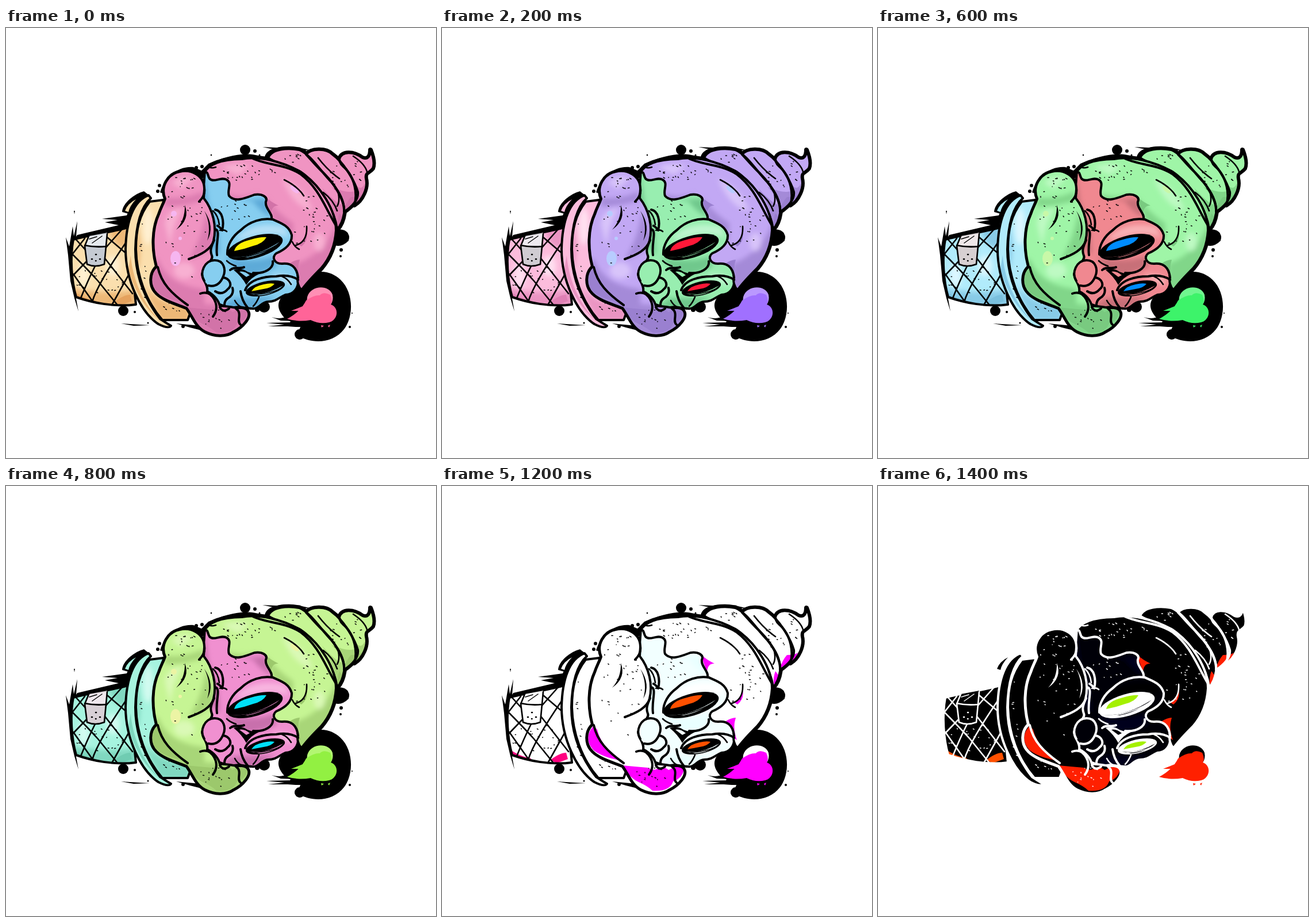
Recreate the animation shown at these times as an HTML page. Size 748 by 748 pixels, loop 1600 ms.

```html
<!DOCTYPE html>
<html lang="en">
<head>
<meta charset="utf-8">
<title>Ice cream</title>
<style>
html, body { margin: 0; width: 100%; height: 100%; overflow: hidden; background: #fff; }
svg { display: block; width: 100vw; height: 100vh; }
.ink { fill: var(--line); }
.halo { fill: var(--line); stroke: var(--line); stroke-width: 12; stroke-linejoin: round; }
.ice { fill: var(--ice); } .face { fill: var(--face); } .cone { fill: var(--cone); }
.deep { fill: var(--deep); } .eye { fill: var(--eye); }
.line { fill: none; stroke: var(--line); stroke-width: 4; stroke-linecap: round; stroke-linejoin: round; }
.thin { stroke-width: 2.6; } .fine { stroke-width: 1.5; }
.soft { filter: url(#blur); }
.dark { fill: var(--shade); } .lite { fill: var(--lite); }
</style>
</head>
<body>
<svg viewBox="0 0 748 748">
<defs>
  <filter id="blur" x="-30%" y="-30%" width="160%" height="160%"><feGaussianBlur stdDeviation="4"/></filter>
  <path id="waffle" d="M117 368 C145 360 180 356 212 347 L226 481 C190 486 150 478 122 468 C114 440 111 400 117 368Z"/>
  <path id="lip" d="M248 291 C222 300 209 335 208 385 C208 440 235 495 265 515 Q283 524 287 518 Q280 514 268 506 C240 470 225 430 225 385 C226 345 234 312 252 296Z"/>
  <path id="collar" d="M250 302 C232 325 226 350 226 385 C227 430 243 475 272 508 L316 508 L330 470 L280 400 L274 299Z"/>
  <path id="blob" d="M277 297 C268 276 282 254 302 250 C324 245 345 258 345 280 L344 296 C360 316 367 345 361 370 C358 380 354 386 358 396 C362 404 344 414 341 428 C342 440 352 446 350 458 C362 464 370 474 372 484 C385 482 395 488 410 487 C424 488 426 500 416 512 C410 520 404 524 396 528 C382 538 362 536 346 528 C330 520 324 500 314 487 C296 480 274 474 262 462 C248 448 250 426 262 415 C254 385 254 350 266 324 C270 312 274 306 277 297Z"/>
  <path id="skin" d="M346 248 L470 262 L500 345 L508 436 C510 452 500 464 486 464 C476 468 470 476 456 476 C444 476 440 490 428 488 C414 488 404 482 392 488 L340 470 L335 400 L343 290Z"/>
  <path id="dome" d="M345 252 C352 238 374 228 410 228 C440 222 480 232 512 250 C548 274 574 318 574 352 C572 384 560 404 548 418 C534 432 524 442 514 456 C508 450 506 440 508 434 C506 416 496 408 480 410 C466 410 462 398 470 392 C484 386 498 376 497 360 C492 342 474 338 462 332 C464 322 450 314 452 302 C456 294 446 288 432 290 C416 296 398 304 388 292 C384 282 394 270 384 264 C374 258 362 270 354 262 C350 256 352 248 345 252Z"/>
  <path id="tierA" d="M456 226 C462 210 490 208 510 212 C530 220 548 250 566 268 C580 285 590 305 588 322 C586 336 582 344 576 350 C572 318 548 276 512 250 C494 240 470 236 456 226Z"/>
  <path id="tierB" d="M522 220 C530 210 556 208 568 220 C585 232 605 262 612 285 C614 300 600 312 588 320 C590 300 570 268 548 248 C536 236 528 226 522 220Z"/>
  <path id="tierC" d="M580 228 C584 214 604 214 620 226 C630 230 634 222 634 212 C638 222 642 234 638 244 C632 252 624 250 626 262 C630 278 620 300 606 308 C612 288 606 262 592 246 C586 240 580 236 580 228Z"/>
  <clipPath id="inWaffle"><use href="#waffle"/></clipPath>
  <clipPath id="inCollar"><use href="#collar"/></clipPath>
  <clipPath id="inBlob"><use href="#blob"/></clipPath>
  <clipPath id="inSkin"><use href="#skin"/></clipPath>
  <clipPath id="inDome"><use href="#dome"/></clipPath>
</defs>

<!-- ink splashes -->
<g class="ink">
  <path d="M520 440 C535 416 566 422 582 438 C605 460 605 502 588 524 C568 550 530 550 506 534 L514 516 L488 508 C474 494 470 482 478 470Z"/>
  <path d="M453 513 L494 512 L500 500 L530 520 L504 520 L490 519 L456 519 L484 516Z"/>
  <path d="M462 503 Q480 508 490 500 L510 510 L478 509Z"/>
  <path d="M167 332 L210 326 L218 308 L224 322 L210 350 L120 366 L124 360 L196 343 L172 338 L194 334Z"/>
  <path d="M202 320 C203 304 224 288 240 284 L249 291 Q226 304 216 324Z"/>
  <path d="M118 318 l2 0 -1 6z M124 336 L122 364 L130 361 L120 372 L120 460 L126 493 L119 470 L112 440 L108 395 L104 364 L110 380 L116 345 L118 362Z"/>
  <path d="M268 286 C276 258 300 240 326 242 L340 248 L352 236 C380 224 410 216 434 221 L450 224 C454 208 480 203 510 208 L528 212 L500 216 L450 232 L345 260 L280 290Z"/>
  <path d="M446 207 L515 210 L470 212Z M200 514 L250 517 L222 518Z M296 514 L338 518 L340 526 L320 521Z"/>
  <path d="M577 350 Q600 350 596 370 Q584 382 572 378Z M552 414 L530 445 L512 460 L505 452Z"/>
  <g id="drops"></g>
</g>

<!-- cone -->
<path d="M207 318 Q211 306 226 298 Q215 310 213 320Z" class="cone"/>
<use href="#waffle" class="cone"/>
<g clip-path="url(#inWaffle)" style="--shade:var(--coneShade);--lite:var(--coneLite)">
  <g class="soft">
    <path class="dark" d="M112 450 Q160 466 230 455 L230 495 L112 490Z M178 350 L215 340 L212 380 Q190 390 178 350Z"/>
    <ellipse class="lite" cx="135" cy="430" rx="10" ry="22"/><ellipse class="lite" cx="186" cy="414" rx="12" ry="18"/>
  </g>
  <path fill="var(--coneDeep)" d="M122 461 Q138 471 155 474 L152 481 L122 472Z M188 477 Q205 464 216 464 L219 475 L200 482Z"/>
</g>
<path class="line thin" d="M121 367 L140 388 M114 392 Q142 420 160 440 L194 482 M117 428 L151 476 M173 402 L220 462 M176 364 L210 393 M115 394 L137 366 M117 430 L141 405 M130 470 Q142 440 155 414 M150 476 Q160 444 208 374 M184 482 L213 430 M172 384 L202 350"/>
<use href="#waffle" class="line"/>
<path fill="var(--patch)" d="M144 362 L176 356 L173 382 L171 412 Q155 417 141 413 L137 379Z"/>
<path fill="var(--patchLite)" d="M145 363 L175 358 L172 378 L139 378Z"/>
<path class="line thin" d="M144 362 L137 379 L141 411 Q155 417 171 411 L174 380 L176 358 M137 378 Q155 382 174 380"/>
<path class="line thin" d="M149 402 h1 M156 394 h1 M163 402 h1 M156 405 h.5"/>
<path class="line fine" d="M145 367 L158 363 M150 374 L167 362"/>
<use href="#collar" class="cone"/>
<g class="soft" clip-path="url(#inCollar)" style="--shade:var(--coneShade);--lite:var(--coneLite)">
  <path class="dark" d="M235 440 Q265 486 320 480 L320 515 L268 510Z M226 340 Q238 370 230 420 L224 400Z"/>
  <ellipse class="lite" cx="247" cy="345" rx="9" ry="32"/>
</g>
<use href="#collar" class="line"/>
<use href="#lip" class="cone"/>
<path d="M217 395 C220 440 242 485 270 511 Q230 480 213 420Z" fill="var(--coneShade)"/>
<use href="#lip" class="line"/>

<!-- swirl -->
<g class="halo">
  <use href="#tierC" stroke-width="8" style="stroke-width:8"/><use href="#tierB" style="stroke-width:8"/><use href="#tierA" style="stroke-width:9"/>
  <use href="#dome" style="stroke-width:9"/><use href="#blob" style="stroke-width:6"/>
</g>
<g class="ice"><use href="#tierC"/><use href="#tierB"/><use href="#tierA"/></g>
<path class="dark" d="M606 270 Q618 286 624 270 Q624 292 607 307 Q612 288 606 270Z M566 276 Q592 288 606 284 Q612 300 588 319 Q586 296 566 276Z M550 278 Q570 302 585 308 Q588 334 577 347 Q572 312 550 278Z"/>
<path class="deep" d="M577 345 Q576 332 580 322 L586 330 Q584 340 577 345Z M588 317 Q592 303 600 294 Q614 294 619 290 Q614 304 602 309Z"/>
<g class="line"><use href="#tierC"/><use href="#tierB"/><use href="#tierA"/></g>
<path class="line thin" d="M604 223 Q624 236 628 250 M578 287 Q581 302 576 310 M552 286 Q570 300 576 318 M543 226 Q560 248 580 262"/>

<!-- face -->
<use href="#skin" class="face"/>
<g class="soft" clip-path="url(#inSkin)" style="--shade:var(--faceShade);--lite:var(--faceLite)">
  <path class="dark" d="M345 250 L352 305 L368 340 L372 395 L355 380 L340 290Z M388 294 Q420 300 452 296 L462 330 Q440 318 430 302Z M380 398 Q430 410 468 396 L470 415 Q420 440 398 418Z M395 470 L470 468 L425 492 L370 490Z"/>
  <path class="lite" d="M400 366 Q430 334 485 346 L492 365 Q460 350 410 368Z M350 420 Q362 404 376 416 L366 436Z M460 430 Q490 424 502 440 L494 448Z"/>
</g>
<use href="#skin" class="line"/>

<use href="#dome" class="ice"/>
<g clip-path="url(#inDome)">
  <g class="soft">
    <path class="dark" d="M578 330 Q560 390 505 410 L505 460 L530 460 L590 380Z M452 294 Q470 320 500 340 L498 372 L465 335Z M386 288 Q410 298 438 288 L430 300 L395 306Z"/>
    <path class="lite" d="M480 262 Q520 278 534 318 Q500 312 480 262Z M375 242 Q400 232 424 240 L404 256Z"/>
    <ellipse class="lite" cx="545" cy="372" rx="10" ry="16"/>
  </g>
  <path class="deep" d="M450 293 Q460 302 474 309 Q462 308 461 324Z M494 409 Q502 404 511 403 Q505 421 513 442 L506 437Z M509 377 Q520 370 523 356 Q526 370 514 380Z"/>
  <ellipse class="gloss" fill="var(--gloss)" cx="502" cy="281" rx="9" ry="4" transform="rotate(40 502 281)"/>
</g>
<use href="#dome" class="line"/>
<path class="line" d="M428 226 C448 238 484 236 512 254 C544 278 554 310 573 342"/>
<path class="line thin" d="M523 345 C524 362 518 374 504 378 M498 372 Q502 381 510 385 M484 264 Q508 276 518 292 M352 241 Q356 245 365 242"/>

<use href="#blob" class="ice"/>
<g clip-path="url(#inBlob)">
  <g class="soft">
    <path class="dark" d="M264 400 Q280 448 345 454 L345 480 L425 485 L420 540 L330 535 L250 470 L250 420Z M348 318 Q342 365 318 402 Q348 396 366 370Z M278 295 Q310 300 342 284 L342 300 Q310 310 275 310Z"/>
    <path class="lite" d="M276 340 Q280 315 308 314 Q290 338 286 380Z M288 270 Q304 252 326 262 L306 280Z"/>
    <ellipse class="lite" cx="310" cy="422" rx="18" ry="14"/><ellipse class="lite" cx="350" cy="505" rx="14" ry="6"/>
  </g>
  <path class="deep" d="M264 417 C252 430 250 445 264 460 C280 472 298 474 314 479 C292 464 276 448 270 424Z M314 486 Q334 488 358 490 Q368 496 374 492 Q386 486 394 494 Q410 486 422 488 Q420 508 402 514 Q396 532 366 530 Q358 522 342 515 Q326 508 314 486Z"/>
  <g fill="var(--gloss)"><ellipse cx="295" cy="401" rx="9" ry="13"/><circle cx="292" cy="323" r="5"/><circle cx="303" cy="366" r="3"/></g>
</g>
<use href="#blob" class="line"/>
<path class="line" d="M264 416 C270 444 288 462 316 482 M362 369 C356 386 340 394 318 402 M350 460 C364 468 372 486 360 502 M338 462 Q348 458 356 464 M372 486 Q378 496 388 488 M400 488 C412 496 400 510 408 516 M345 279 Q347 291 336 302"/>
<path class="ink" d="M311 308 Q321 333 296 351 Q312 333 311 308Z M345 318 Q358 344 350 370 Q364 346 345 318Z"/>

<!-- features -->
<path class="face" d="M345 440 C336 426 345 404 363 404 C379 404 383 420 378 432 Q370 452 352 448Z"/>
<path class="line" d="M345 440 C336 426 345 404 363 404 C379 404 383 420 378 432 Q370 452 352 448 M364 316 C376 318 380 336 376 352 Q372 346 368 344 M364 350 C374 352 364 375 367 395 M408 352 C424 336 446 330 464 333 M408 352 C394 362 384 378 385 394 M378 434 C390 436 394 448 386 454 Q376 466 364 458 M394 452 Q397 464 386 470 Q380 474 380 482 M390 421 C396 414 408 420 414 416 M430 426 C450 428 466 418 464 406 M416 456 C422 438 448 432 470 432 Q494 428 508 438 M408 458 Q410 474 420 486"/>
<path class="line thin" d="M360 318 Q369 326 371 342 M372 352 Q380 350 384 354 M398 474 Q402 482 410 486 M440 468 Q436 478 430 484 M480 432 Q490 436 496 446 M384 405 Q390 411 400 414"/>
<path class="ink" d="M396 421 Q408 416 420 424 Q430 428 440 428 Q426 434 418 447 Q410 432 396 421Z"/>
<path class="face" d="M406 424 Q414 422 424 430 L418 433Z"/>
<g class="ink">
  <ellipse cx="433" cy="381" rx="50" ry="19" transform="rotate(-16 433 381)"/>
  <ellipse cx="451" cy="453" rx="35" ry="12" transform="rotate(-13 451 453)"/>
</g>
<path class="face" d="M390 398 Q430 402 476 372 Q450 394 420 399Z M424 462 Q452 466 482 448 Q464 464 440 465Z"/>
<path class="line fine" d="M398 400 Q436 398 470 378 M408 402 Q440 400 464 386 M432 464 Q460 462 476 454"/>
<g class="eye">
  <path d="M397 388 Q400 374 426 368 Q444 363 453 364 Q447 375 430 379 Q414 385 397 388Z"/>
  <path d="M427 458 Q432 449 448 446 Q460 443 467 445 Q462 452 448 454Z"/>
</g>
<path class="line fine" d="M406 390 Q438 386 466 368 M436 460 Q456 458 474 447"/>

<!-- heart -->
<path fill="var(--heartLite)" d="M514 492 Q524 480 524 468 C530 447 562 446 568 464 Q570 474 565 481 L530 500Z"/>
<path fill="var(--heart)" d="M489 506 Q512 494 522 474 Q536 464 546 465 Q552 458 564 464 Q569 475 565 481 C580 486 578 508 562 512 Q546 516 530 508 Q508 512 489 506Z"/>
<path fill="var(--heart)" d="M548 517 l5 1 -4 3z M560 518 l4 -2 -2 5z M496 492 L516 484 L510 492Z"/>
<path class="line fine" id="specks"/>
</svg>
<script>
const names = "ice shade lite face faceShade faceLite cone coneShade coneLite eye heart heartLite patch patchLite gloss deep coneDeep line".split(" ");
const looks = [
  "f094c2 dc7bb0 f8b0d2 86cef0 5daad8 b6e0f7 fbdfae edb877 fff0d2 fff000 ff6498 ff8fb4 c5cad2 e6eaee f6b6f0 d273a8 e5a25e 000",
  "c2a8f4 a48ad8 d8c4fa 98eeb0 70c88c c0f6d0 fcbcdc ea94c2 ffe0f0 ff1838 a070ff ba98ff d0ccd2 eeeaf0 b8ccff 9a80d0 e080b4 000",
  "a4e1ef 7ec8da c2eff8 ede49b cabd7b f6f0c2 c0a5f4 a181e2 e3d4ff 8a00ff 43c4f4 6fd7f8 dad7ce f0eee8 b6f5e6 77bfd0 9674d8 000",
  "9ff5a7 81d689 befac3 f08890 c76f78 f8b2b6 b1ebfb 88cbe7 dcf7ff 008cff 3df36a 70f68f d7d0d2 efe8e9 c8f8a8 79ca80 7ac0de 000",
  "c6f594 a8d678 daf9b6 f090d0 c870ac f8b6e0 a6f4df 80d8c0 d2fbf0 00e0f8 92f042 b2f672 d8d0d6 f0e8ee ecf4a4 9cc86c 70ccb2 000",
  "edf096 d3cf7a f4f4b8 d088f5 a869ce e0b2fb 9bf5b8 7bdd99 ccfcdc 00ef80 dcf43e e8f871 d9cfdb eee6f0 f6dfb0 c9c36c 70d08c 000",
  "fff fff fff f2ffff e9ffff fff fff fff fff ff5000 f0f fff fff fff fff f0f ff0080 000",
  "000 000 000 000008 00001c 000 000 000 000 a4f000 ff2000 000 000 000 000 ff2000 ff5000 fff"
].map(row => row.split(" "));

let seed = 7;
const rand = () => (seed = seed * 16807 % 2147483647) / 2147483647;

// speckles scattered in ellipses: cx, cy, rx, ry, count
const patches = [
  [308, 355, 40, 85, 34], [310, 270, 24, 14, 10], [365, 508, 34, 18, 16], [420, 255, 54, 18, 24],
  [530, 345, 32, 54, 26], [498, 226, 24, 8, 8], [580, 262, 20, 26, 14], [612, 254, 8, 30, 7],
  [400, 322, 30, 22, 12], [164, 440, 42, 32, 24], [240, 400, 8, 70, 10], [288, 488, 16, 12, 7]
];
let marks = "";
for (const [cx, cy, rx, ry, n] of patches)
  for (let i = 0; i < n; i++) {
    const a = rand() * 6.283, r = Math.sqrt(rand());
    marks += `M${(cx + rx * r * Math.cos(a)).toFixed(1)} ${(cy + ry * r * Math.sin(a)).toFixed(1)}l${(rand() * 2.5).toFixed(1)} ${(rand() * 2 - .5).toFixed(1)}`;
  }
document.getElementById("specks").setAttribute("d", marks);

const drops = [
  [416, 212, 9], [433, 214, 3], [441, 221, 1.5], [449, 485, 10], [437, 490, 4], [204, 492, 9], [224, 494, 2],
  [511, 533, 9], [588, 364, 9], [583, 386, 3], [582, 397, 2], [267, 274, 3], [264, 284, 3], [331, 243, 3],
  [341, 241, 3], [357, 221, 1.3], [598, 520, 2], [602, 496, 1], [308, 519, 3], [247, 513, 1.5]
];
document.getElementById("drops").innerHTML =
  drops.map(([x, y, r]) => `<circle cx="${x}" cy="${y}" r="${r}"/>`).join("");

const style = document.documentElement.style;
let shown = -1;
function draw() {
  const step = Math.floor(performance.now() % 1600 / 200);
  if (step !== shown) {
    shown = step;
    names.forEach((name, i) => style.setProperty("--" + name, "#" + looks[step][i]));
  }
  requestAnimationFrame(draw);
}
draw();
</script>
</body>
</html>
```
